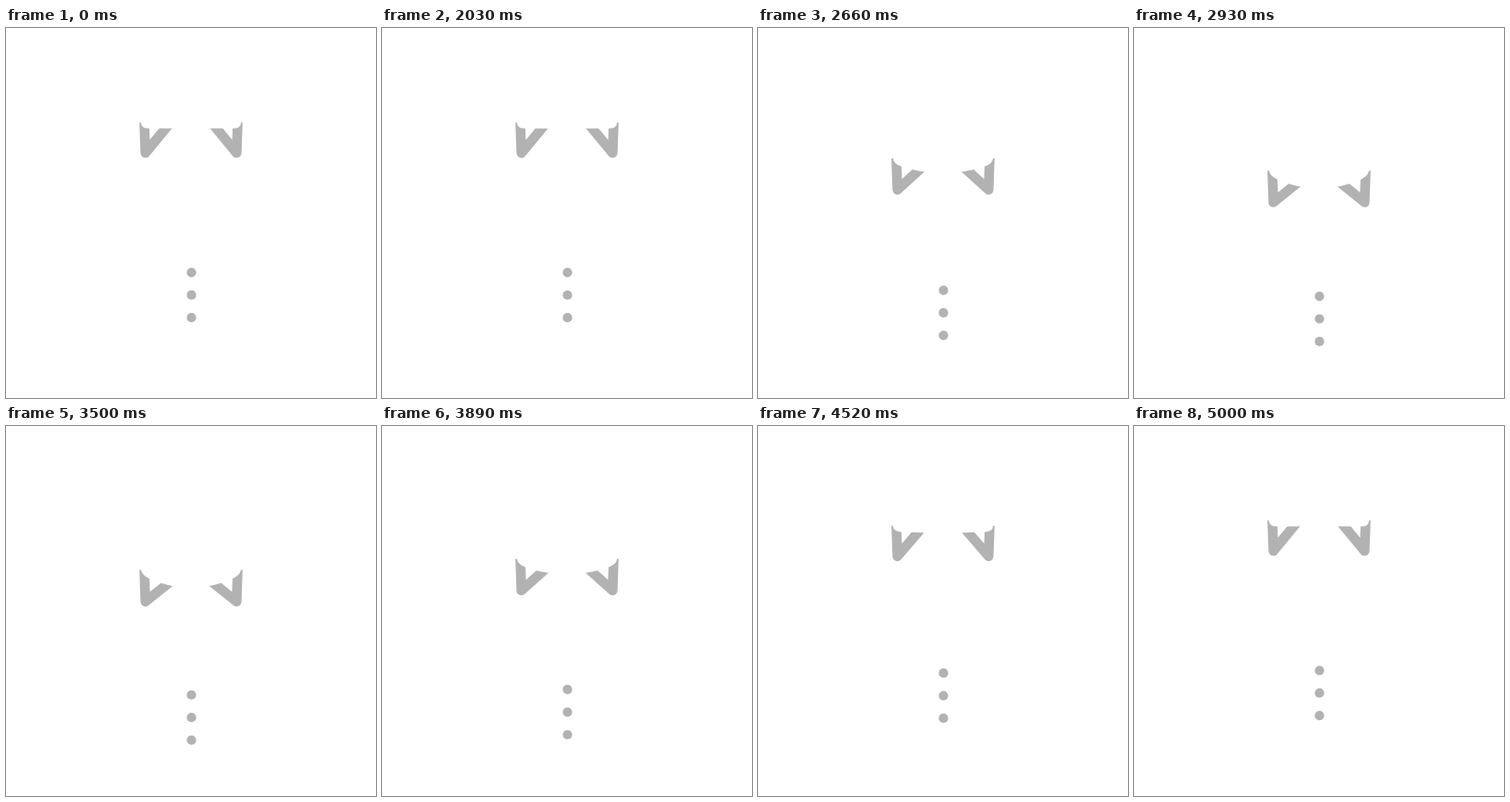
Recreate the animation shown at these times as an HTML page with a canvas. Size 400 px wide and 400 px high, loop 5060 ms.

```html
<!DOCTYPE html>
<html lang="en">
<head>
<meta charset="utf-8">
<title>Nod</title>
<style>
  html, body { margin: 0; width: 100%; height: 100%; overflow: hidden; background: #fff; }
  canvas { display: block; }
</style>
</head>
<body>
<canvas id="stage" width="400" height="400"></canvas>
<script>
const ctx = document.getElementById('stage').getContext('2d');
const LOOP = 5060, START = 2030, STEP = 30;
const GREY = '#b2b2b2';

// [time in ms, depth of the nod]
const keys = [
  [2000, 0], [2200, .1], [2450, .48], [2540, .61], [2930, 1], [3275, 1.025],
  [3620, 1], [3890, .8], [4160, .45], [4520, .11], [4700, .02], [4860, -.05], [5000, 0]
];

function slope(i) {
  const a = keys[i - 1], b = keys[i + 1];
  return a && b ? (b[1] - a[1]) / (b[0] - a[0]) : 0;
}

// Smooth cubic through the keys, flat at both ends
function nod(t) {
  const i = keys.findIndex(k => k[0] > t) - 1;
  if (i < 0) return 0;
  const [t0, p0] = keys[i], [t1, p1] = keys[i + 1];
  const d = t1 - t0, u = (t - t0) / d, v = 1 - u;
  return v * v * ((1 + 2 * u) * p0 + u * d * slope(i))
       + u * u * ((1 + 2 * v) * p1 - v * d * slope(i + 1));
}

function hair(p) {
  const tip = 135 + 53.5 * p;
  ctx.beginPath();
  ctx.moveTo(149.5, 102 + 52 * p);
  ctx.lineTo(150.7, tip);
  ctx.lineTo(185.7, tip - 35 * (1.21 - .4 * p));
  ctx.stroke();
}

function cap(p) {
  const side = 102.5 + 51 * p, edge = 108.5 + 54.7 * p, corner = edge - 4 * p;
  ctx.beginPath();
  ctx.moveTo(146, 40);
  ctx.lineTo(146, side);
  ctx.quadraticCurveTo(146, corner, 154, edge);
  ctx.quadraticCurveTo(200, edge + 20.8 * p, 246, edge);
  ctx.quadraticCurveTo(254, corner, 254, side);
  ctx.lineTo(254, 40);
  ctx.fill();
}

function draw(p) {
  ctx.fillStyle = '#fff';
  ctx.fillRect(0, 0, 400, 400);

  ctx.strokeStyle = GREY;
  ctx.lineWidth = 10.6;
  ctx.lineJoin = 'round';
  hair(p);
  ctx.save();
  ctx.translate(400, 0);
  ctx.scale(-1, 1);
  hair(p);
  ctx.restore();
  cap(p);

  ctx.fillStyle = GREY;
  for (let i = 0; i < 3; i++) {
    ctx.beginPath();
    ctx.arc(200.5, 264.3 + 24.4 * i + 25.8 * p, 5.1, 0, 2 * Math.PI);
    ctx.fill();
  }
}

function frame() {
  const t = performance.now() % LOOP;
  draw(t < START ? 0 : nod(START + Math.floor((t - START) / STEP) * STEP));
  requestAnimationFrame(frame);
}
frame();
</script>
</body>
</html>
```
